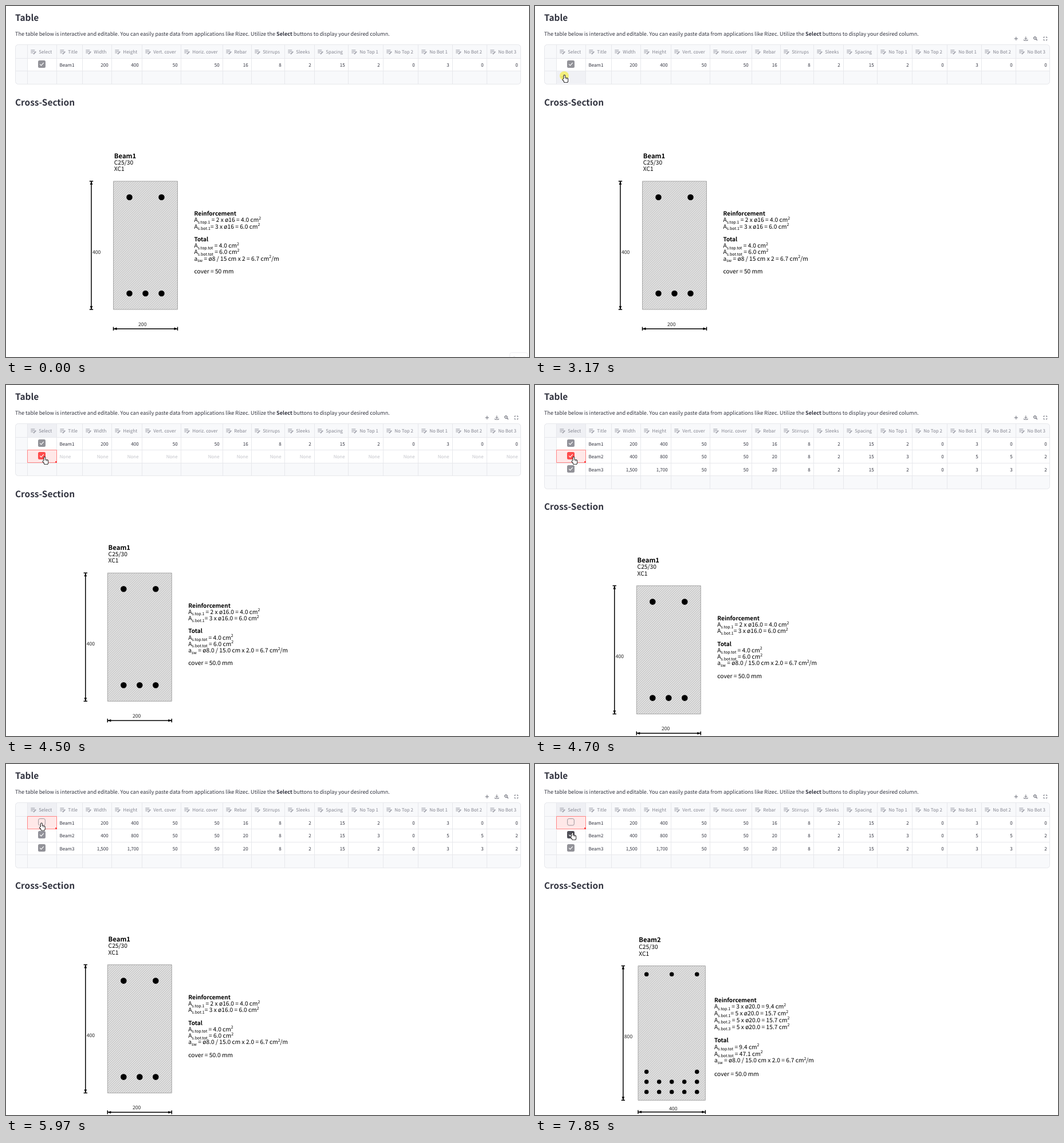
Write an HTML page with a canvas that moves like this. It is 913 px wide and 613 px high and loops after 8 s.

```html
<!DOCTYPE html>
<html lang="en">
<head>
<meta charset="utf-8">
<title>Beam table</title>
<style>
html, body { margin: 0; width: 100%; height: 100%; overflow: hidden; background: #fff; }
canvas { display: block; }
</style>
</head>
<body>
<canvas id="stage" width="913" height="613"></canvas>
<script>
const W = 913, H = 613, LOOP = 8000;
const c = document.getElementById('stage').getContext('2d');

const FONT = '"Noto Sans CJK SC", "Noto Sans CJK JP", "Noto Sans CJK KR", "Noto Sans", sans-serif';
const INK = '#31333f', LINE = '#e7e8ec', PALE = '#f8f9fb', RED = '#ff4b4b', GREY = '#929298';
const CELL = 8.03, BODY = 9.12, TITLE = 15.4, NOTE = 10.25;

const HEADS = ['Select', 'Title', 'Width', 'Height', 'Vert. cover', 'Horiz. cover', 'Rebar', 'Stirrups',
  'Sleeks', 'Spacing', 'No Top 1', 'No Top 2', 'No Bot 1', 'No Bot 2', 'No Bot 3'];
const BEAMS = [
  'Beam1 200 400 50 50 16 8 2 15 2 0 3 0 0',
  'Beam2 400 800 50 50 20 8 2 15 3 0 5 5 2',
  'Beam3 1,500 1,700 50 50 20 8 2 15 2 0 3 3 2'
].map(s => s.split(' '));
const EMPTY = Array(14).fill('None');

const ramp = (t, a, b) => Math.max(0, Math.min(1, (t - a) / (b - a)));
const rowY = i => Math.round(91 + 22.4 * i);

function setFont(size, weight = 400) {
  c.font = `${weight} ${size}px ${FONT}`;
  c.textRendering = 'geometricPrecision';
}

function text(s, x, y, size, color = INK, weight = 400, align = 'left') {
  setFont(size, weight);
  c.textAlign = align;
  c.fillStyle = color;
  c.fillText(s, x, y);
  return x + c.measureText(s).width;
}

function box(x, y, w, h, color) {
  c.fillStyle = color;
  c.fillRect(x, y, w, h);
}

function outline(x, y, w, h, r, color) {
  c.beginPath();
  c.roundRect(x, y, w, h, r);
  c.strokeStyle = color;
  c.lineWidth = 1;
  c.stroke();
}

function stroke(color, width, ...lines) {
  c.strokeStyle = color;
  c.lineWidth = width;
  c.beginPath();
  for (const p of lines)
    for (let i = 0; i < p.length; i += 2) i ? c.lineTo(p[i], p[i + 1]) : c.moveTo(p[0], p[1]);
  c.stroke();
}

function disc(x, y, r, color) {
  c.fillStyle = color;
  c.beginPath();
  c.arc(x, y, r, 0, 7);
  c.fill();
}

function faded(a, fn) {
  if (a <= 0) return;
  c.save();
  c.globalAlpha *= a;
  fn();
  c.restore();
}

function at(x, y, fn) {
  c.save();
  c.translate(x, y);
  fn();
  c.restore();
}

// <...> is a subscript, [...] a superscript
function rich(s, x, y) {
  s.split(/<(.*?)>|\[(.*?)\]/).forEach((part, i) => {
    if (!part) return;
    const kind = i % 3;
    x = text(part, x, y + [0, 2.6, -4.4][kind], kind ? 7 : NOTE, '#000');
  });
}

// Columns are as wide as their headings plus equal padding
function columns() {
  setFont(CELL);
  const widths = HEADS.map(h => c.measureText(h).width);
  const pad = (862 - widths.reduce((a, b) => a + b)) / widths.length;
  const edges = [37];
  widths.forEach((w, i) => edges.push(edges[i] + w + pad));
  return edges.map(Math.round);
}
const COLS = columns();

function editIcon(x) {
  at(x, 77, () => {
    for (let i = 0; i < 3; i++) stroke('#a3a4ad', 1.1, [0, i * 2.4, i < 2 ? 7 : 4, i * 2.4]);
    stroke('#a3a4ad', 1.8, [4.6, 7, 9, 2.6]);
  });
}

const plus = (r, color) => stroke(color, 1, [-r, 0, r, 0], [0, -r, 0, r]);

const TOOLS = [
  g => plus(3.2, g),
  g => stroke(g, 1, [0, -3.5, 0, 1.4], [-2.2, -.8, 0, 1.4, 2.2, -.8], [-3.2, 1.6, -3.2, 3.2, 3.2, 3.2, 3.2, 1.6]),
  g => {
    stroke(g, 1.2, [.5, .5, 3, 3]);
    c.beginPath();
    c.arc(-1, -1, 2.1, 0, 7);
    c.stroke();
  },
  g => {
    for (let i = 0; i < 4; i++) {
      stroke(g, 1, [1, 2.8, 2.8, 2.8, 2.8, 1]);
      c.rotate(Math.PI / 2);
    }
  }
];

const toolbar = () => TOOLS.forEach((tool, i) => at(839.8 + 17 * i, 57, () => tool('#6d6f7a')));

function checkbox(row, on, color) {
  at(56, rowY(row) + 4, () => {
    if (on < 1) outline(.7, .5, 11.6, 11.6, 2.5, '#9b949b');
    faded(on, () => {
      c.beginPath();
      c.roundRect(0, 0, 13, 13, 2.5);
      c.fillStyle = color;
      c.fill();
      stroke('#fff', 1.2, [3.2, 6.6, 5.4, 8.9, 9.8, 4.1]);
    });
  });
}

function table(s, t) {
  const n = s.rows.length, end = rowY(n + 1), cell = COLS[1] - 37;
  const hover = s.sel < 0 && t > 2950;
  c.save();
  c.beginPath();
  c.roundRect(16, 67, 883, end - 66, 5);
  c.clip();
  box(16, 67, 883, end - 66, PALE);
  box(37, 91, 862, rowY(n) - 91, '#fff');
  if (s.sel >= 0) {
    box(37, 67, cell, 24, '#eff0f4');
    box(37, rowY(s.sel), cell, 22, '#ffe8e8');
  }
  if (hover) box(37, rowY(n), cell, 22, '#f0f1f5');
  for (const x of COLS.slice(0, -1)) box(x, 67, 1, end - 67, LINE);
  for (let i = 0; i <= n; i++) box(16, rowY(i), 883, 1, LINE);
  c.restore();
  outline(16.5, 67.5, 882, end - 67, 5, LINE);

  HEADS.forEach((h, i) => {
    editIcon(COLS[i] + 6.3);
    text(h, COLS[i] + 20.3, 83, CELL, '#858691');
  });
  s.rows.forEach((row, r) => row.forEach((v, i) => {
    const x = i ? COLS[i + 2] - 5.3 : COLS[1] + 5.5;
    text(v, x, rowY(r) + 14.6, CELL, v === 'None' ? '#c3c4ca' : INK, 400, i ? 'right' : 'left');
  }));

  if (s.sel >= 0) {
    const y = rowY(s.sel);
    outline(37.5, y + .5, cell, 22, 0, '#ff8585');
    box(35 + cell, y + 20, 3, 3, RED);
  }
  s.checks.forEach(([on, color], i) => checkbox(i, on, color));
  if (hover) at(49.5, rowY(n) + 11, () => plus(4.5, '#85868f'));
}

// Dimension line with end ticks and arrowheads
function dimension(x, y, len, angle) {
  at(x, y, () => {
    c.rotate(angle);
    stroke('#000', 1.5, [0, 0, len, 0], [0, -3.2, 0, 3.2], [len, -3.2, len, 3.2]);
    c.fillStyle = '#000';
    for (const [p, d] of [[0, 6], [len, -6]]) {
      c.beginPath();
      c.moveTo(p, 0);
      c.lineTo(p + d, -2.3);
      c.lineTo(p + d, 2.3);
      c.fill();
    }
  });
}

function hatch(w, h) {
  c.save();
  c.beginPath();
  c.rect(0, 0, w, h);
  c.clip();
  box(0, 0, w, h, '#e2e2e2');
  for (let d = 0; d < w + h; d += 4) stroke('#a0a0a0', .65, [d, 0, d - h, h]);
  c.restore();
  outline(0, 0, w, h, 0, '#a6a6a6');
}

function notes(top, bots, [dia, stirrup, legs, gap], dec) {
  const num = v => dec ? v.toFixed(1) : v;
  const area = (n, d) => n * Math.PI * d * d / 400;
  const cm2 = n => area(n, dia).toFixed(1) + ' cm[2]';
  const bar = (label, n) => `A<s.${label}>${label === 'bot.1' ? '' : ' '}= ${n} x ø${num(dia)} = ${cm2(n)}`;
  // The sheet repeats the second layer's count for the third
  const counts = bots.map((n, i) => bots[Math.min(i, 1)]);
  const sum = counts.reduce((a, b) => a + b);
  const shear = (area(legs, stirrup) / gap * 100).toFixed(1);
  return ['Reinforcement', bar('top.1', top), ...counts.map((n, i) => bar(`bot.${i + 1}`, n)), '',
    'Total', `A<s.top.tot> = ${cm2(top)}`, `A<s.bot.tot> = ${cm2(sum)}`,
    `a<sw> = ø${num(stirrup)} / ${num(gap)} cm x ${num(legs)} = ${shear} cm[2]/m`, '', `cover = ${num(50)} mm`];
}

// Scaled drawing of one table row, k in pixels per millimetre
function section([name, ...values], x, y, k, dec) {
  const [width, height, cover, , dia, stirrup, legs, gap, top, , ...layers] = values.map(Number);
  const bots = layers.filter(n => n > 0);
  const w = width * k, h = height * k, edge = cover * k, pitch = h / 20;

  const bars = (n, by) => {
    for (let i = 0; i < n; i++) disc(edge + (w - 2 * edge) * i / (n - 1), by, dia * k / 2 + .8, '#000');
  };

  at(x, y, () => {
    text(name, 1.3, -18 - 2 * pitch, 11.3, '#000', 700);
    text('C25/30', 1.3, -18 - pitch, NOTE, '#000');
    text('XC1', 1.3, -18, NOTE, '#000');
    hatch(w, h);
    bars(top, edge);
    bots.forEach((n, i) => bars(n, h - edge - i * 3 * dia * k));

    const side = -12.5 - 46.5 * k, base = h + 6 + 49.4 * k;
    dimension(side, 0, h, Math.PI / 2);
    dimension(0, base, w, 0);
    text(height, side + 2, h / 2 + 3.8 + 19.7 * k, 8.6, '#222');
    text(width, w / 2 + 4 - 29.3 * k, base - 1 - 6.8 * k, 8.6, '#222');

    notes(top, bots, [dia, stirrup, legs, gap], dec).forEach((s, i) => {
      const nx = w + 1 + 50 * k, ny = h * .269 + i * pitch;
      if (s === 'Reinforcement' || s === 'Total') text(s, nx, ny, 10.1, '#000', 700);
      else rich(s, nx, ny);
    });
  });
}

function page(s, t) {
  box(0, 0, W, H, '#fff');
  text('Table', 16, 26, TITLE, INK, 700);
  let x = text('The table below is interactive and editable. You can easily paste data from applications like Rizec. Utilize the ',
    16, 52.4, BODY);
  x = text('Select', x, 52.4, BODY, INK, 700);
  text(' buttons to display your desired column.', x, 52.4, BODY);
  faded(ramp(t, 2850, 3050), toolbar);
  table(s, t);
  const drop = 22.3 * (s.rows.length - 1);
  text('Cross-Section', 16, 173.6 + drop, TITLE, INK, 700);
  if (t >= 6110) section(BEAMS[1], 180, 352.5, .2935, true);
  else section(BEAMS[0], t < 3440 ? 187.5 : 177.3, 306 + drop, .56, t >= 3440);
}

function badge() {
  outline(879.5, 605.5, 31, 20, 3, '#ededf0');
  text('Screen', 885, 617, 7, '#d5d5da');
}

const shade = p => {
  const v = Math.round(146 - 66 * p);
  return `rgb(${v},${v},${v + 8})`;
};

function state(t) {
  const grey = [1, GREY];
  if (t < 3240) return { rows: [BEAMS[0]], sel: -1, checks: [grey] };
  if (t < 4570) return { rows: [BEAMS[0], EMPTY], sel: 1, checks: [grey, [ramp(t, 4030, 4230), RED]] };
  const picked = t >= 5840;
  const first = [1 - ramp(t, 5800, 5970), picked ? RED : shade(ramp(t, 5450, 5650))];
  const second = [1, picked ? shade(ramp(t, 7600, 7800)) : RED];
  return { rows: BEAMS, sel: picked ? 0 : 1, checks: [first, second, grey] };
}

// Pointer moves: start, end, x, y reached
const MOVES = [[1530, 1530, 900, 599], [1530, 1820, 529.5, 411], [1820, 2310, 1, 150], [2310, 2400, 1, 188],
  [2400, 3110, 47.5, 120], [3440, 3500, 63.5, 125], [5310, 5650, 58, 102.5], [7370, 7850, 61.5, 119]];

function place(t) {
  let x = 0, y = 0;
  for (const [a, b, toX, toY] of MOVES) {
    const p = t >= b ? 1 : ramp(t, a, b);
    x += (toX - x) * p;
    y += (toY - y) * p;
  }
  return [x, y];
}

const arrowShape = new Path2D('M0 0V10.2L2.3 8 4 11.7 5.6 11 4 7.4 7 7.2Z');
const handShape = new Path2D();
handShape.roundRect(3, 1, 1.9, 9, 1);
handShape.roundRect(3, 5.8, 6.8, 7.4, 2.2);
handShape.roundRect(.9, 7.6, 4, 2.2, 1.1);

function pointer(t) {
  if (t < 1530) return;
  const hand = t >= 2940, shape = hand ? handShape : arrowShape;
  if (t > 3110 && t < 3300) disc(51, 122, 8, 'rgba(245,238,60,.65)');
  at(...place(t), () => {
    c.strokeStyle = '#111';
    c.lineWidth = 1.8;
    c.lineJoin = 'round';
    c.stroke(shape);
    c.fillStyle = '#fff';
    c.fill(shape);
    if (hand) stroke('#111', .6, [6.4, 6, 6.4, 8], [8.1, 6, 8.1, 8]);
  });
}

function draw(t) {
  page(state(t), t);
  faded(1 - ramp(t, 1100, 1260), badge);
  pointer(t);
}

let start;
function tick(now) {
  start ??= now;
  draw((now - start) % LOOP);
  requestAnimationFrame(tick);
}
draw(0);
requestAnimationFrame(tick);
</script>
</body>
</html>
```
